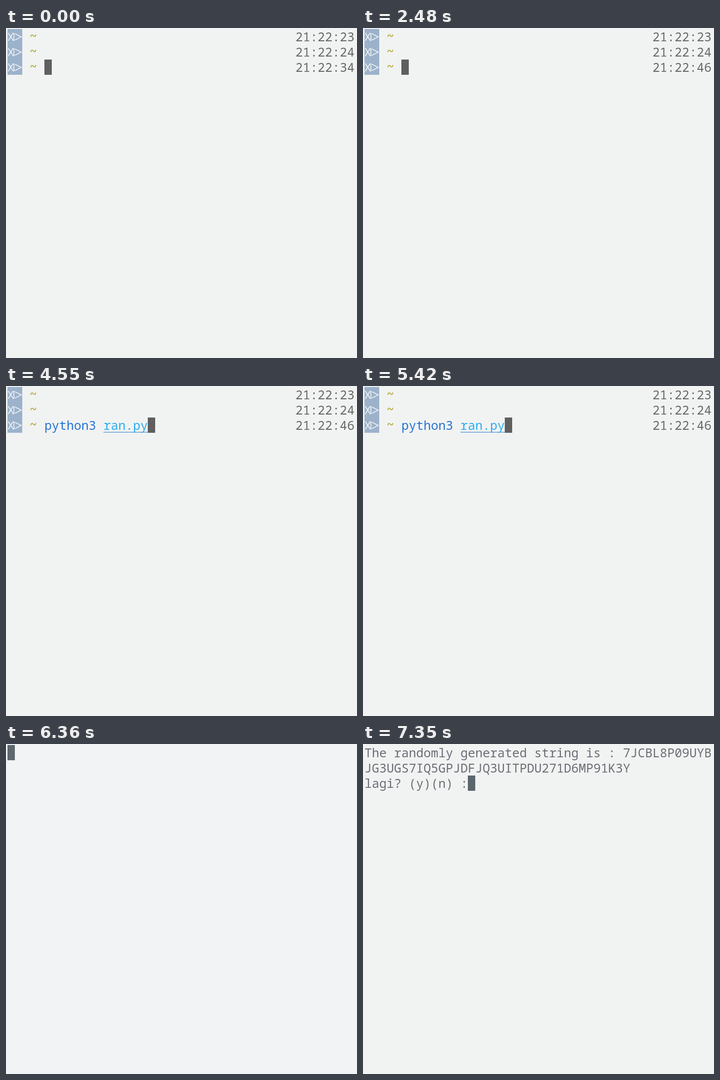
Animation of 713x670 px, one loop 8 s. Source, as an HTML page with a canvas:

```html
<!DOCTYPE html>
<html lang="en">
<head>
<meta charset="utf-8">
<title>Terminal</title>
<style>
html, body { margin: 0; width: 100%; height: 100%; overflow: hidden; background: #f1f3f2; }
canvas { display: block; }
</style>
</head>
<body>
<canvas id="screen" width="713" height="670"></canvas>
<script>
const ctx = document.getElementById('screen').getContext('2d');
const LOOP = 8000, CELL = 15, LINE = 31, LEFT = 3, TOP = 2;
const GREY = '#686868', CURSOR = '#5f5f5f', SLATE = '#6c6e76';
const BLUE = '#2673d5', CYAN = '#2cacf2', RED = '#f52c2c';

const colX = col => LEFT + col * CELL;
const rowY = row => TOP + row * LINE;

function write(text, col, row, color = GREY, weight = 400, lift = 0) {
  ctx.font = `${weight} 25px "Noto Sans Mono", "DejaVu Sans Mono", monospace`;
  ctx.fillStyle = color;
  [...text].forEach((ch, i) => ctx.fillText(ch, colX(col + i), rowY(row) + 24.5 - lift));
}

function block(col, row, color = CURSOR, cells = 1) {
  ctx.fillStyle = color;
  ctx.fillRect(colX(col), rowY(row), CELL * cells, LINE);
}

function prompt(row, time) {
  const y = rowY(row);
  block(0, row, '#9cb2cb', 2);
  ctx.strokeStyle = '#eef2f5';
  ctx.lineWidth = 1.7;
  ctx.stroke(new Path2D(
    `M4.5 ${y + 8}L15 ${y + 24}M14.5 ${y + 8}L4.5 ${y + 24}` +
    `M16 ${y + 8}V${y + 24}M18 ${y + 9.5}L31 ${y + 16}L18 ${y + 22.5}`));
  write('~', 3, row, '#b3ad3c', 600, 2);
  write(time, 39, row);
}

function shell(time) {
  ['21:22:23', '21:22:24', time].forEach((t, row) => prompt(row, t));
}

function command() {
  shell('21:22:46');
  write('python3', 5, 2, BLUE);
  write('ran.py', 13, 2, CYAN);
  ctx.fillStyle = '#609fd8';
  ctx.fillRect(colX(13), 93, CELL * 6, 1.5);
}

function output() {
  write('The randomly generated string is : 7JCBL8P09UYB', 0, 0, SLATE);
  write('JG3UGS7IQ5GPJDFJQ3UITPDU271D6MP91K3Y', 0, 1, SLATE);
  write('lagi? (y)(n) :', 0, 2, SLATE);
  block(14, 2, '#5c666d');
}

// Each scene starts at its time in ms and holds until the next.
const scenes = [
  { at: 0, draw() { shell('21:22:34'); block(5, 2); } },
  { at: 1140, draw() { shell('21:22:46'); block(5, 2); } },
  { at: 3370, draw() {
    shell('21:22:46');
    write('p', 5, 2, RED);
    write('thon3 ran.py', 7, 2);
    block(6, 2);
  } },
  { at: 4550, draw() { command(); block(19, 2); } },
  { at: 6000, draw() { command(); block(0, 3); } },
  { at: 6360, paper: '#f2f3f5', draw() { block(0, 0, '#5e686f'); } },
  { at: 6380, draw: output }
];

const start = performance.now();
let shown;

function tick(now) {
  const t = Math.max(0, now - start) % LOOP;
  const scene = scenes.findLast(s => s.at <= t);
  if (scene !== shown) {
    shown = scene;
    ctx.fillStyle = scene.paper || '#f1f3f2';
    ctx.fillRect(0, 0, 713, 670);
    scene.draw();
  }
  requestAnimationFrame(tick);
}
tick(start);
</script>
</body>
</html>
```
